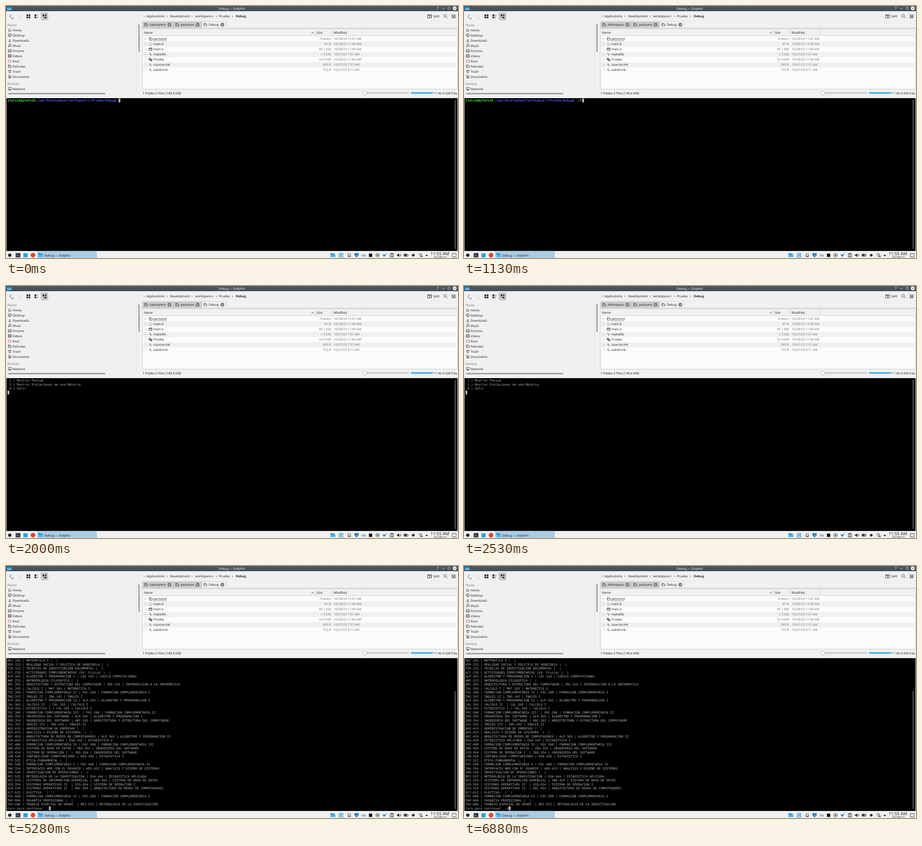
An HTML page that plays this animation: 960 px wide and 536 px high, repeating every 8 s.

```html
<!DOCTYPE html>
<html lang="en">
<head>
<meta charset="utf-8">
<title>File manager with terminal</title>
<style>
  html, body { margin: 0; width: 100%; height: 100%; overflow: hidden; background: #eff0f1; }
  svg { display: block; width: 960px; height: 536px; }
  text { font: 6.667px "Noto Sans", sans-serif; fill: #232629; white-space: pre; text-rendering: geometricPrecision; }
  #screen text { font: 6.644px "DejaVu Sans Mono", monospace; fill: #b2b2b2; }
  #screen .user { fill: #54ff54; font-weight: bold; }
  #screen .path { fill: #5454ff; font-weight: bold; }
</style>
</head>
<body>
<svg viewBox="0 0 960 536">
  <defs>
    <linearGradient id="bar" x2="0" y2="1"><stop stop-color="#505a62"/><stop offset="1" stop-color="#424b53"/></linearGradient>
  </defs>
  <g id="desktop"></g>
  <g id="screen"></g>
</svg>
<script>
const INK = '#232629', GRAY = '#73777a', BLUE = '#3daee9', PALE = '#eff0f1', EDGE = '#bfc1c3';

const rect = (x, y, w, h, fill, more = '') => `<rect x="${x}" y="${y}" width="${w}" height="${h}" fill="${fill}" ${more}/>`;
const circle = (x, y, r, fill, more = '') => `<circle cx="${x}" cy="${y}" r="${r}" fill="${fill}" ${more}/>`;
const line = (d, color = INK, width = .8) => `<path d="${d}" fill="none" stroke="${color}" stroke-width="${width}"/>`;
const shape = (d, fill = INK) => `<path d="${d}" fill="${fill}"/>`;
const frame = (x, y, w, h, color = INK, width = .8) => rect(x, y, w, h, 'none', `stroke="${color}" stroke-width="${width}"`);
// Labels are placed by the vertical centre of their capitals.
const label = (x, y, s, color = INK, style = '') => `<text x="${x}" y="${y + 2.4}" style="fill:${color};${style}">${s}</text>`;
const END = 'text-anchor:end', MIDDLE = 'text-anchor:middle';

const chevron = (x, y, r = 1.7, color = INK) => line(`M${x - r / 2} ${y - r}l${r} ${r}l${-r} ${r}`, color, .7);
const folder = (x, y) => line(`M${x - 3} ${y + 2.6}v-5.4h2.6l.9 1.3h2.7v4.1zM${x - 3} ${y - 1}h2.4l1-.6`);
const blueFolder = (x, y) =>
  shape(`M${x - 5} ${y + 4}v-8h4l1 1.2h4v6.8z`, '#147eb8') + rect(x - 5, y - 1.2, 10, 5.2, '#4cb5ee');
const cross = (x, y, r, color) => line(`M${x - r} ${y - r}l${2 * r} ${2 * r}m0 ${-2 * r}l${-2 * r} ${2 * r}`, color, .8);

function titleBar() {
  return rect(0, 0, 960, 11, 'url(#bar)') + blueFolder(7, 5) +
    label(479.7, 5.2, 'Debug — Dolphin', '#fcfcfc', MIDDLE) +
    label(917, 5.2, '?', '#fcfcfc', MIDDLE + ';font-size:8px') +
    line('M926.5 4l2.5 2.5l2.5-2.5M941 2l3 3l-3 3l-3-3z', '#fcfcfc') +
    circle(953, 5, 4, '#fcfcfc') + cross(953, 5, 1.7, '#424b53');
}

function toolBar() {
  let out = line('M12 18l-4.3 4l4.3 4') + shape('M12.5 26h4l-2 2z') +
    line('M25 18l4.3 4l-4.3 4', '#b4b6b8') + shape('M30 26h4l-2 2z', '#b4b6b8') +
    rect(74.5, 14.5, 14.5, 15, '#c9cbcd', 'stroke="#a6a9ab" stroke-width=".8" rx="1.5"');
  for (const dx of [0, 4.6]) for (const dy of [0, 4.6]) out += rect(43.5 + dx, 18 + dy, 3.5, 3.5, INK);
  for (const y of [18, 22.6]) out += rect(60.5, y, 3.5, 3.5, INK) + line(`M65.2 ${y + 1}h3m-3 2h2`, INK, .7);
  out += rect(78, 18, 3.5, 3.5, INK) + rect(83, 18, 3, 3, INK) + line('M80 21v4h3') + rect(82.6, 22.8, 3.4, 3.4, INK);
  [293.5, 342, 395, 447, 481].forEach(x => out += chevron(x, 22));
  [[298.3, 'Applications'], [348.5, 'Development'], [401.7, 'workspace-c'], [452.3, 'Prueba']]
    .forEach(([x, s]) => out += label(x, 22, s));
  return out + label(488, 22, 'Debug', INK, 'font-weight:bold') +
    frame(895.5, 18.5, 8, 7) + line('M895.5 20h8M899.5 20v5.5m1.5-2.7h2') + label(907, 22, 'Split') +
    circle(932.5, 21, 2.8, 'none', `stroke="${INK}" stroke-width=".8"`) + line('M934.5 23l3 3') +
    line('M946.5 19.3h8.3m-8.3 2.8h8.3m-8.3 2.8h8.3', INK, 1.1);
}

function placesPanel() {
  const places = ['Home', 'Desktop', 'Downloads', 'Music', 'Pictures', 'Videos', 'Root', 'Peliculas', 'Trash', 'Documents'];
  const icons = [
    y => line(`M4.6 ${y}l3.2-3l3.2 3M5.4 ${y - .4}v3h4.8v-3`),
    y => frame(5, y - 2.8, 6, 4.2) + line(`M6 ${y + 2.7}h4`),
    y => line(`M8 ${y - 3}v4m-2-1.8l2 2l2-2M5 ${y + 2.7}h6`),
    y => line(`M6.5 ${y + 2}v-5h3.8v4.4`) + circle(5.8, y + 2, 1, INK) + circle(9.6, y + 1.6, 1, INK),
    y => frame(5, y - 2.7, 6, 5.4) + line(`M5 ${y + 2}l2-2l2 1.5l2-2`),
    y => frame(5, y - 2.7, 6, 5.4) + line(`M6.5 ${y - 2.7}v5.4m3-5.4v5.4`),
    y => line(`M5 ${y + 2.6}v-5.4h2.6l.9 1.3h2.7v4.1z`, '#da4453'),
    y => folder(8, y),
    y => line(`M5 ${y - 2}h6M6 ${y - 2}l.4 4.8h3.2l.4-4.8M7 ${y - 3}h2`),
    y => line(`M5.7 ${y - 3}h3l1.8 1.8v4.2h-4.8zM7 ${y}h2.2m-2.2 1.5h2.2`)
  ];
  let out = label(3, 40.3, 'Places', GRAY);
  places.forEach((s, i) => {
    const y = 51.2 + 11 * i;
    out += icons[i](y) + label(14, y, s);
  });
  return out + label(3, 165.2, 'Remote', GRAY) + label(14, 176.2, 'Network') +
    frame(5, 173.3, 6, 4) + line('M8 177.3v2m-2.5 0h5') +
    line('M277.5 33v148.5', '#dcdee0') +
    rect(281, 38, 3, 59.5, '#a2a4a6', 'rx="1.5"') + rect(4.5, 184.7, 206.5, 3.2, '#a2a4a6', 'rx="1.6"');
}

function tabs() {
  let out = line('M290 46.6h669', EDGE, .7);
  [[290, 66, 'Adempiere', 347], [356, 59.5, 'pensums', 407], [415.5, 52, 'Debug', 459.5]].forEach(([x, w, s, close], i) => {
    out += rect(x, 33, w, 13.8, i === 2 ? PALE : '#c9cbcd', `stroke="${EDGE}" stroke-width=".6"`) +
      folder(x + 7.7, 39.7) + label(x + 15.2, 40, s) +
      circle(close, 39.8, 4, '#77797b') + cross(close, 39.8, 1.4, '#fcfcfc');
  });
  return out;
}

function fileList() {
  const files = [
    ['pensums', '4 items', '10/28/23 11:07 AM'],
    ['main.d', '47 B', '10/28/23 11:49 AM'],
    ['main.o', '85.1 KiB', '10/28/23 11:49 AM'],
    ['makefile', '1.3 KiB', '10/27/23 7:37 AM'],
    ['Prueba', '52.9 KiB', '10/28/23 11:49 AM'],
    ['sources.mk', '390 B', '10/27/23 7:37 AM'],
    ['subdir.mk', '722 B', '10/27/23 8:11 AM']
  ];
  const wrench = y => circle(305.8, y - 1.2, 1.5, '#8a8d90') + line(`M306.2 ${y - .5}l2.8 3`, '#5f6265', 1.3);
  const icons = [
    y => folder(307.3, y),
    y => line(`M304 ${y - 2.4}h3m-3 2.4h6m-6 2.4h6`, '#96999b', .8),
    y => frame(304, y - 2.7, 6, 5.4) + line(`M304 ${y - 1.3}h6`) + circle(307, y + .8, .8, INK),
    wrench,
    y => circle(305.5, y - 1, 1.7, 'none', `stroke="${INK}" stroke-width="1.3"`) + circle(308.7, y + 1.5, 1.3, 'none', `stroke="${INK}" stroke-width="1.2"`),
    wrench, wrench
  ];
  let out = rect(290, 48.5, 669, 128.3, '#fcfcfc', `stroke="${EDGE}" stroke-width=".8"`) +
    rect(290.4, 49, 668.2, 14, PALE) +
    line('M290 63.4h669M656.6 49v14M692.6 49v14M755.6 49v14', '#cbcdcf', .8) +
    label(293, 56.8, 'Name') + label(660, 56.8, 'Size') + label(696, 56.8, 'Modified') +
    line('M648.8 58l2.5-2.5l2.5 2.5');
  files.forEach(([name, size, date], i) => {
    const y = 69.9 + 11 * i;
    if (i % 2) out += rect(290.5, y - 5.4, 668, 11, PALE);
    out += icons[i](y) + label(313, y, name) + label(690, y, size, GRAY, END) + label(696, y, date, GRAY);
    if (i) out += line(`M295.8 ${y - 5.5}V${i < 6 ? y + 5.5 : y}M295.8 ${y}h5`, '#c9cbcd', .7);
  });
  return out + chevron(295.7, 69.8, 2, GRAY) + line('M312.8 73.8h28.2', INK, .5);
}

function statusBar() {
  return label(290, 185.2, '1 Folder, 6 Files (140.4 KiB)') +
    rect(762, 183.6, 94, 3, '#c3c5c7', 'rx="1.5"') +
    circle(762, 185.1, 4.2, '#f7f7f8', 'stroke="#9fa2a4" stroke-width=".8"') +
    rect(860, 183.6, 57, 3, '#bfc1c3', 'rx="1.5"') + rect(860, 183.6, 46, 3, BLUE, 'rx="1"') +
    label(958, 185.2, '45.0 GiB free', INK, END);
}

function taskBar() {
  const y = 530;
  return rect(0, 521, 960, 15, PALE) + line('M0 521.5h960', '#d8dbdd', .6) +
    circle(8, y, 3.6, INK) +
    rect(20.5, 525.5, 10, 9, '#2b3238') + line('M22 528.5h4m-4 2.5h6', '#b8c0c6', .7) +
    rect(37, 526, 9, 8.5, '#2aa1e0') + circle(57.4, y, 5, '#db4a3b') +
    rect(66, 522.5, 127, 13.5, '#a9cee5') + rect(66, 522.2, 127, .8, '#7fbde2') +
    blueFolder(74, y) + label(81.5, 530.4, 'Debug — Dolphin') +
    blueFolder(694.5, y) +
    frame(707.8, 526.3, 7.6, 7.6, '#2188cc', 1.2) + circle(711.6, y, 1.8, '#2188cc') +
    line('M726.5 532v-3l1-2h3l1 2v3zM725 532.3h8M728 534h2M725.5 527l1-1M732.5 527l-1-1') +
    shape('M740 525.8h9v4.5l-4.5 4.5l-4.5-4.5z', '#1f72b8') + line('M742 529.5l2 2l3.5-3.5', '#fff', 1) +
    label(759.7, 530.3, 'EN', '#1c4693', MIDDLE) +
    rect(770.8, 526.7, 7, 7, '#111') +
    circle(789.3, y, 3.8, 'none', `stroke="${INK}" stroke-width=".8"`) + shape('M788 528l3.5 2l-3.5 2z') +
    shape('M799.5 528l3.5 6l6-8l-5.5 3z', '#1983c6') +
    frame(816.3, 527, 6.4, 6.6, INK, 1) + rect(817.8, 525.6, 3.4, 2, INK) + line('M818 530h3m-3 1.8h3', INK, .6) +
    shape('M830.5 528.5h2l2.5-2.5v8l-2.5-2.5h-2z') + line('M836.3 528q1.6 2 0 4M837.7 526.8q2.6 3.2 0 6.4', INK, .7) +
    frame(845, 527.4, 8, 5.2) + rect(846, 528.3, 5, 3.4, INK) + rect(853.4, 529, 1, 2, INK) +
    circle(865, y, 2.8, INK) +
    line('M876 528.5q4-3.4 8 0M877.3 530.3q2.7-2.2 5.4 0') + circle(880, 532.5, 1.1, INK) + rect(882, 531, 2.6, 2.6, INK) +
    shape('M890.5 531.7l3-3.2l3 3.2z') +
    label(921.5, 527.8, '11:55 AM', INK, MIDDLE + ';font-size:9.1px') +
    label(921.8, 535, '10/28/23', INK, MIDDLE) +
    frame(948, 526.5, 8, 7.3);
}

document.getElementById('desktop').innerHTML = rect(0, 0, 960, 536, PALE) + titleBar() + toolBar() +
  placesPanel() + tabs() + fileList() + statusBar() + rect(1, 196, 958, 325, '#000') + taskBar();

const MENU = [' 1 ) Mostrar Pensum', ' 2 ) Mostrar Prelaciones de una Materia', ' 0 ) Salir'];
const COURSES = `MAT-165 | MATEMATICA I |  |
RSP-133 | REALIDAD SOCIAL Y POLITICA DE VENEZUELA |  |
TID-122 | TECNICAS DE INVESTIGACION DOCUMENTAL |  |
ACC-220 | ACTIVIDADES COMPLEMENTARIAS (Ed. Física) |  |
ALP-265 | ALGORITMO Y PROGRAMACION I | LOC-154 | LOGICA COMPUTACIONAL
ANF-233 | ANTROPOLOGIA FILOSOFICA |  |
ARC-265 | ARQUITECTURA Y ESTRUCTURA DEL COMPUTADOR | INI-154 | INTRODUCCION A LA INFORMATICA
CAL-265 | CALCULO I | MAT-165 | MATEMATICA I
FOC-200 | FORMACION COMPLEMENTARIA II | FOC-100 | FORMACION COMPLEMENTARIA I
ING-243 | INGLES II | ING-143 | INGLES I
ALP-365 | ALGORITMO Y PROGRAMACION II | ALP-265 | ALGORITMO Y PROGRAMACION I
CAL-365 | CALCULO II  | CAL-265 | CALCULO I
ESA-343 | ESTADISTICA I | CAL-265 | CALCULO I
FOC-300 | FORMACION COMPLEMENTARIA III  | FOC-200 | FORMACION COMPLEMENTARIA II
INS-354 | INGENIERIA DEL SOFTWARE | ALP-265 | ALGORITMO Y PROGRAMACION I
INS-354 | INGENIERIA DEL SOFTWARE | ARC-265 | ARQUITECTURA Y ESTRUCTURA DEL COMPUTADOR
IGL-332 | INGLES III | ING-243 | INGLES II
ADE-433 | ADMINISTRACION DE EMPRESAS |  |
ADS-433 | ANALISIS Y DISEÑO DE SISTEMAS  |  |
ARC-454 | ARQUITECTURA DE REDES DE COMPUTADORES | ALP-365 | ALGORITMO Y PROGRAMACION II
ESA-444 | ESTADISTICA APLICADA | ESA-343 | ESTADISTICA I
FOC-400 | FORMACION COMPLEMENTARIA IV | FOC-300 | FORMACION COMPLEMENTARIA III
SBD-454 | SISTEMA DE BASE DE DATOS | INS-354 | INGENIERIA DEL SOFTWARE
SIO-454 | SISTEMA DE OPERACION I  | INS-354 | INGENIERIA DEL SOFTWARE
CON-544 | CONTABILIDAD COMPUTARIZADA | ESA-343 | ESTADISTICA I
ETF-522 | ETICA FUNDAMENTAL |  |
FOC-500 | FORMACION COMPLEMENTARIA V | FOC-400 | FORMACION COMPLEMENTARIA IV
INU-554 | INTERFACES WEB CON EL USUARIO | ADS-433 | ANALISIS Y DISEÑO DE SISTEMAS
INO-544 | INVESTIGACION DE OPERACIONES |  |
MEI-522 | METODOLOGIA DE LA INVESTIGACION | ESA-444 | ESTADISTICA APLICADA
SDI-554 | SISTEMAS DE INFORMACION GERENCIAL | SBD-454 | SISTEMA DE BASE DE DATOS
SIO-554 | SISTEMAS OPERATIVOS II  | SIO-454 | SISTEMA DE OPERACION I
SIO-554 | SISTEMAS OPERATIVOS II  | ARC-454 | ARQUITECTURA DE REDES DE COMPUTADORES
ELT-622 | ELECTIVA:  |  |
FOC-600 | FORMACION COMPLEMENTARIA VI | FOC-500 | FORMACION COMPLEMENTARIA V
PAP-604 | PASANTIA PROFESIONAL |  |
TEG-606 | TRABAJO ESPECIAL DE GRADO  | MEI-522 | METODOLOGIA DE LA INVESTIGACION`.split('\n');

const USER = 'jtolvik@jtolvik', PATH = '/opt/Development/workspace-c/Prueba/Debug';
const prompt = typed => [`${USER}:${PATH}$ ${typed}`];
const listing = typed => [...COURSES, 'Cero para continuar...' + typed];

// Each entry: start in ms, lines on screen (the cursor follows the last one).
const STATES = [
  [0, prompt('')], [80, prompt('.')], [400, prompt('./')], [1130, prompt('./P')],
  [1330, prompt('./Pr')], [1480, prompt('./Pru')], [1600, prompt('./Prueba ')],
  [1930, [...prompt('./Prueba '), '']], [2000, [...MENU, '']], [4600, [...MENU, '1']],
  [5280, listing('')], [6880, listing('0')]
];
const LOOP = 8000, LEFT = 3, TOP = 197, CELL = 4, ROW = 8.5;

const colored = s => s
  .replace(USER, '<tspan class="user">$&</tspan>')
  .replace(PATH, '<tspan class="path">$&</tspan>');

function drawScreen(lines) {
  const last = lines.length - 1, scroll = lines.length > 30 ? 266 : 199.5;
  return lines.map((s, i) => `<text x="${LEFT}" y="${TOP + 6.3 + ROW * i}">${colored(s)}</text>`).join('') +
    rect(LEFT + CELL * lines[last].length, TOP + ROW * last, CELL, 8, '#b2b2b2') +
    rect(952.6, scroll, 2.9, 517.5 - scroll, '#45484a', 'rx="1.4"');
}

const screen = document.getElementById('screen');
let shown;
function tick() {
  const t = performance.now() % LOOP;
  const state = STATES.findLast(([start]) => start <= t);
  if (state !== shown) {
    shown = state;
    screen.innerHTML = drawScreen(state[1]);
  }
  requestAnimationFrame(tick);
}
tick();
</script>
</body>
</html>
```
